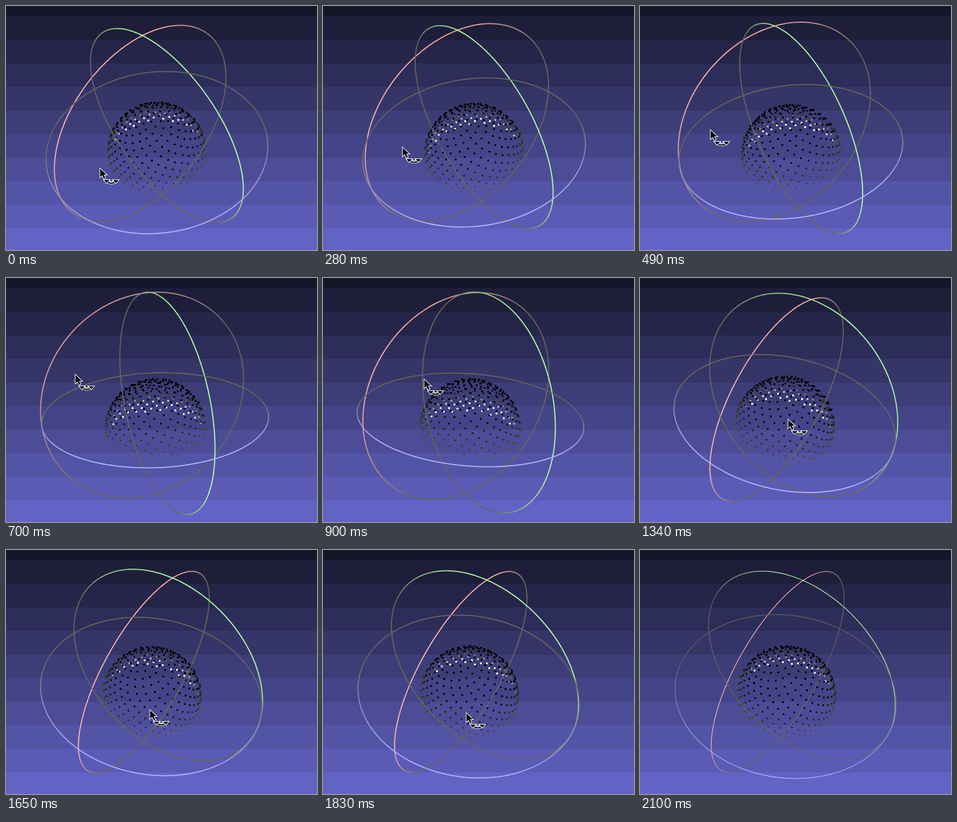
These frames come from a looping animation (517x408 px, 2780 ms). An HTML page with a canvas:

```html
<!DOCTYPE html>
<html lang="en">
<head>
<meta charset="utf-8">
<title>Trackball</title>
<style>
  html, body { margin: 0; width: 100%; height: 100%; overflow: hidden; background: #16162a; }
  canvas { display: block; }
</style>
</head>
<body>
<canvas id="view" width="517" height="408"></canvas>
<script>
const ctx = document.getElementById('view').getContext('2d');
const LOOP = 2780, RELEASE = 1900, POINTER_GONE = 2090;
const CX = 247, CY = 214, SCALE = 180, PERSP = 0.33;
const DOME = 0.473, RIM = -0.08, DOTS = 330, GOLDEN = Math.PI * (3 - Math.sqrt(5));

// the drag: time, then roll, elevation and turn in degrees, then the pointer's tip
const DRAG = [
  [0,    -7.0, 45.1, 36.5, 156, 271],
  [490,  -7.3, 34.8, 27.3, 117, 207],
  [700,  -2.1, 23.6, 22.8, 115, 161],
  [1090, 10.1, 25.3, 51.0, 221, 190],
  [1340, 12.1, 34.8, 63.0, 246, 236],
  [1650, 10.2, 43.0, 63.2, 239, 267],
  [1880,  8.4, 45.6, 61.3, 238, 273]
];

// smooth path through timed keys
function sample(keys, t) {
  const last = keys.length - 1;
  if (t >= keys[last][0]) return keys[last].slice(1);
  let i = 0;
  while (t >= keys[i + 1][0]) i++;
  const a = keys[i], b = keys[i + 1];
  const before = keys[Math.max(i - 1, 0)], after = keys[Math.min(i + 2, last)];
  const span = b[0] - a[0], u = (t - a[0]) / span, u2 = u * u, u3 = u2 * u;
  return a.slice(1).map((v, n) => {
    const j = n + 1;
    const m0 = (b[j] - before[j]) / (b[0] - before[0]) * span;
    const m1 = (after[j] - v) / (after[0] - a[0]) * span;
    return (2 * u3 - 3 * u2 + 1) * v + (u3 - 2 * u2 + u) * m0 +
           (3 * u2 - 2 * u3) * b[j] + (u3 - u2) * m1;
  });
}

const mix = (p, q, a, b) => p.map((v, i) => a * v + b * q[i]);

// screen axes: x right, y down, z towards the viewer
function axesFrom(angles) {
  const [roll, lift, turn] = angles.map(d => d * Math.PI / 180);
  const { sin, cos } = Math;
  const side = [cos(roll), sin(roll), 0];
  const front = [-sin(roll) * sin(lift), cos(roll) * sin(lift), cos(lift)];
  const up = [sin(roll) * cos(lift), -cos(roll) * cos(lift), sin(lift)];
  return [
    mix(side, front, sin(turn), cos(turn)),
    mix(side, front, -cos(turn), sin(turn)),
    up
  ];
}

function project(p) {
  const s = SCALE / (1 - PERSP * p[2]);
  return [CX + p[0] * s, CY + p[1] * s];
}

function drawBackground() {
  for (let i = 0; i < 11; i++) {
    const c = Math.round(22 + 7.7 * i), b = Math.round(42 + 15.6 * i);
    ctx.fillStyle = `rgb(${c},${c},${b})`;
    ctx.fillRect(0, Math.ceil(39.43 * i - 22.83), 517, 408);
  }
}

function drawDome([x, y, z]) {
  const dots = [];
  for (let i = 0; i < DOTS; i++) {
    const h = RIM + (1 - RIM) * (i + 0.5) / DOTS, r = Math.sqrt(1 - h * h);
    const ring = mix(x, y, r * Math.cos(i * GOLDEN), r * Math.sin(i * GOLDEN));
    const normal = mix(ring, z, 1, h);
    const p = mix(normal, z, DOME, -DOME * 0.49);
    const base = 78 * Math.max(0, 1 - h / 0.65);
    const facing = Math.max(0, -normal[2]);
    const lit = 255 * Math.min(1, facing * 1.7 * Math.max(0, 1 - h / 0.5));
    dots.push({ p, shade: Math.max(base, lit) });
  }
  dots.sort((m, n) => m.p[2] - n.p[2]);
  for (const { p, shade } of dots) {
    const [sx, sy] = project(p);
    ctx.fillStyle = `rgb(${shade},${shade},${shade * 0.92})`;
    ctx.fillRect(Math.round(sx) - 1, Math.round(sy) - 1, 3, 3);
  }
}

function drawRing(u, v, hue, width) {
  const steps = 120;
  const at = i => {
    const a = i / steps * 2 * Math.PI;
    return mix(u, v, Math.cos(a), Math.sin(a));
  };
  ctx.lineWidth = width;
  for (let i = 0; i < steps; i++) {
    const p = at(i), q = at(i + 1);
    const light = Math.min(0.7, Math.max(0, (p[2] + q[2]) / 2));
    const rgb = [0, 1, 2].map(c => (c === 2 ? 96 : 102) + light * (c === hue ? 228 : 112));
    ctx.strokeStyle = `rgb(${rgb})`;
    ctx.beginPath();
    ctx.moveTo(...project(p));
    ctx.lineTo(...project(q));
    ctx.stroke();
  }
}

function outlined(points) {
  ctx.beginPath();
  points.forEach(([x, y]) => ctx.lineTo(x, y));
  ctx.closePath();
  ctx.lineWidth = 2;
  ctx.strokeStyle = '#fff';
  ctx.fillStyle = '#000';
  ctx.stroke();
  ctx.fill();
}

function drawPointer(x, y) {
  ctx.save();
  ctx.translate(Math.round(x), Math.round(y));
  outlined([[0.5, 1], [0.5, 15], [4, 12], [6.5, 17.5], [9, 16.5], [6.5, 11], [11, 11]]);
  // curved double arrow
  ctx.translate(19, 20);
  for (const [color, width] of [['#fff', 4], ['#000', 2]]) {
    ctx.strokeStyle = color;
    ctx.lineWidth = width;
    ctx.beginPath();
    ctx.moveTo(-8, 1);
    ctx.quadraticCurveTo(0, 10, 8, 1);
    ctx.stroke();
  }
  for (const s of [-1, 1]) outlined([[s * 12, 0], [s * 3, 0], [s * 8, 5]]);
  ctx.lineWidth = 1;
  ctx.beginPath();
  ctx.arc(0, 0, 3, 0, Math.PI);
  ctx.stroke();
  ctx.restore();
}

function draw(t) {
  const [roll, lift, turn, px, py] = sample(DRAG, t);
  const axes = axesFrom([roll, lift, turn]), [x, y, z] = axes;
  const width = t < RELEASE ? 1.8 : 1.2;
  drawBackground();
  drawDome(axes);
  drawRing(y, z, 0, width);
  drawRing(z, x, 1, width);
  drawRing(x, y, 2, width);
  if (t < POINTER_GONE) {
    const away = Math.max(0, (t - RELEASE) / (POINTER_GONE - RELEASE));
    drawPointer(px + 98 * away, py + 125 * away);
  }
}

const start = performance.now();
function tick() {
  draw((performance.now() - start) % LOOP);
  requestAnimationFrame(tick);
}
tick();
</script>
</body>
</html>
```
